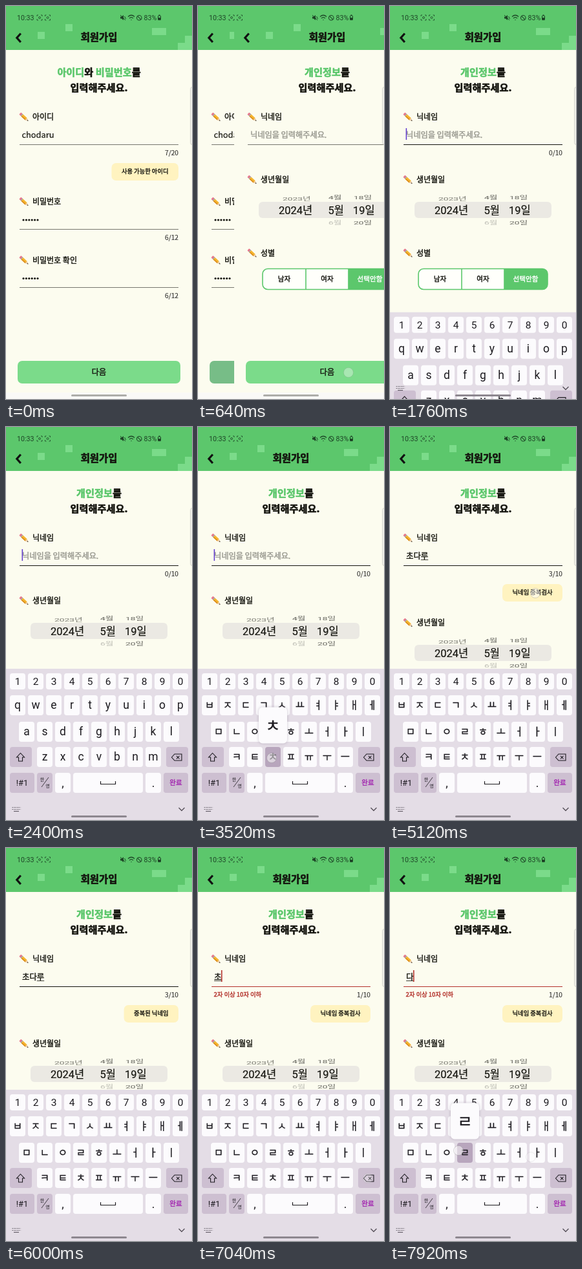
Recreate the animation shown at these times as an HTML page with a canvas. Size 288 px wide and 608 px high, loop 8000 ms.

```html
<!DOCTYPE html>
<html lang="ko">
<head>
<meta charset="utf-8">
<style>
html, body { margin: 0; width: 100%; height: 100%; overflow: hidden; background: #fcfcef; }
canvas { display: block; width: 288px; height: 608px; }
</style>
</head>
<body>
<canvas></canvas>
<script>
const W = 288, H = 608, LOOP = 8000;
const GREEN = '#5cc76c', LIGHT = '#7bdb8a', CREAM = '#fcfcef', INK = '#15150f', RED = '#b3312b';
const canvas = document.querySelector('canvas'), c = canvas.getContext('2d');
const dpr = window.devicePixelRatio || 1;
canvas.width = W * dpr;
canvas.height = H * dpr;

const clamp = v => Math.max(0, Math.min(1, v));
const easeOut = (t, start, dur, power) => 1 - (1 - clamp((t - start) / dur)) ** power;

function box(x, y, w, h, r, fill, stroke, lw = 1) {
  c.beginPath();
  c.roundRect(x, y, w, h, r);
  if (fill) { c.fillStyle = fill; c.fill(); }
  if (stroke) { c.strokeStyle = stroke; c.lineWidth = lw; c.stroke(); }
}
function path(d, stroke, lw = 1, fill) {
  const p = new Path2D(d);
  if (fill) { c.fillStyle = fill; c.fill(p); }
  if (stroke) { c.strokeStyle = stroke; c.lineWidth = lw; c.stroke(p); }
}
const HANGUL = '"Noto Sans CJK KR", "Noto Sans CJK"', ROBOTO = 'Roboto, ' + HANGUL;
const setFont = (size, weight = 500, font = HANGUL) => c.font = `${weight} ${size}px ${font}, sans-serif`;

// y is the optical middle of the line, fat an outline that thickens the strokes
function text(s, x, y, size, { color = INK, weight = 500, align = 'left', font = HANGUL, fat = .4 } = {}) {
  setFont(size, weight, font);
  c.textAlign = align;
  c.fillStyle = c.strokeStyle = color;
  c.fillText(s, x, y + size * .37);
  if (fat) {
    c.lineWidth = fat;
    c.lineJoin = 'round';
    c.strokeText(s, x, y + size * .37);
    c.lineJoin = 'miter';
  }
  return c.measureText(s).width;
}

// ---- schedule ----
// down, up, x, y, fade
const taps = [
  [80, 480, 233, 567, 520], [1360, 1450, 215, 200], [2640, 2750, 60, 549],
  [3500, 3600, 114, 512], [3620, 3700, 170, 473], [3760, 3840, 72, 432],
  [3900, 3980, 218, 474], [4060, 4150, 112, 465], [4170, 4250, 199, 513],
  [5120, 5230, 225, 257], [6400, 6540, 263, 511], [6640, 6720, 263, 511],
  [6860, 6940, 263, 511], [7100, 7180, 263, 511],
  [7500, 7590, 72, 432], [7700, 7800, 218, 478], [7900, 8100, 106, 468]
];
const edits = [
  [1400, ''], [3600, 'ㅊ'], [3700, '초'], [3840, '촏'], [3980, '초다'], [4150, '초달'], [4250, '초다루'],
  [6540, '초달'], [6720, '초다'], [6940, '초'], [7180, ''], [7590, 'ㄷ'], [7800, '다']
];
const FOCUS = 1600, KOREAN = 2880, TYPING = 3600, TAKEN = 5440, CLEARING = 6540;

// ---- keyboard layout ----
const keys = [];
function row(x, y, h, en, ko) {
  [...en].forEach((ch, i) => keys.push({ x: x + i * 28, y, w: 24, h, en: ch, ko: ko[i] }));
}
row(6, 381, 25, '1234567890', '1234567890');
row(6, 415, 31, 'qwertyuiop', 'ㅂㅈㄷㄱㅅㅛㅕㅑㅐㅔ');
row(20, 456, 31, 'asdfghjkl', 'ㅁㄴㅇㄹㅎㅗㅓㅏㅣ');
row(48, 495, 31, 'zxcvbnm', 'ㅋㅌㅊㅍㅠㅜㅡ');
for (const [x, y, w, en, dark] of [
  [6, 495, 34, '', 1], [248, 495, 34, '', 1], [6, 535, 38, '!#1', 1], [48, 535, 24, '', 1],
  [76, 535, 24, ','], [104, 535, 108, ''], [216, 535, 24, '.'], [244, 535, 38, '완료', 1]
]) keys.push({ x, y, w, h: 31, en, ko: en, dark });

const hit = (k, x, y) => x >= k.x && x <= k.x + k.w && y >= k.y && y <= k.y + k.h;

// ---- page parts ----
function header() {
  box(0, 0, W, H, 0, CREAM);
  box(0, 0, W, 68, 0, GREEN);
  for (const [x, y, w, h] of [[49, 40, 11, 11], [92, 28, 11, 11], [226, 34, 22, 11], [266, 57, 22, 11], [277, 46, 11, 11]])
    box(x, y, w, h, 0, LIGHT);
  path('M22.8 42.5L16.8 49.2L22.8 56', '#111', 3.2);
  text('회원가입', 144, 48, 15.4, { weight: 700, align: 'center', fat: .6 });
}
function title(parts) {
  const opt = { weight: 900, fat: .6 };
  setFont(15.2, 900);
  let x = 144 - c.measureText(parts.map(p => p[0]).join('')).width / 2;
  for (const [s, color] of parts) x += text(s, x, 102, 15.2, { ...opt, color });
  text('입력해주세요.', 144, 126, 15.2, { ...opt, align: 'center' });
}
function label(s, y) {
  c.save();
  c.translate(28, y);
  c.rotate(Math.PI / 4.2);
  box(-8.5, -2.2, 3.2, 4.4, 1, '#e8798c');
  box(-5.6, -2.2, 1.4, 4.4, 0, '#9aa0a6');
  box(-4.2, -2.2, 8.4, 4.4, 0, '#f5b52e');
  box(-4.2, .7, 8.4, 1.5, 0, '#d98a1e');
  path('M4.2 -2.2L9 0L4.2 2.2Z', null, 0, '#ecc9a0');
  path('M7 -.9L9 0L7 .9Z', null, 0, '#333');
  c.restore();
  text(s, 41, y, 12);
}
const rule = (y, color) => path(`M21 ${y}H267`, color);
const counter = (s, y) => text(s, 267, y, 10.2, { align: 'right', color: '#333', weight: 400, fat: .15 });

function chip(s, shade = 0) {
  setFont(9.3);
  const w = c.measureText(s).width + 31;
  box(267 - w, 243, w, 27, 7, '#fff3c0');
  if (shade) box(267 - w, 243, w, 27, 7, `rgba(90,80,40,${shade})`);
  text(s, 267 - w / 2, 256, 9.3, { align: 'center' });
}
function nextButton(shade = 0) {
  box(18, 549, 252, 35, 7, LIGHT);
  if (shade) box(18, 549, 252, 35, 7, `rgba(110,100,125,${shade})`);
  text('다음', 144, 566, 12.2, { align: 'center' });
}

function accountPage(t) {
  header();
  title([['아이디', GREEN], ['와 ', INK], ['비밀번호', GREEN], ['를', INK]]);
  label('아이디', 172);
  text('chodaru', 24.5, 199, 12.8, { weight: 400, fat: .2 });
  rule(214.5, '#77776f');
  counter('7/20', 227);
  chip('사용 가능한 아이디');
  [['비밀번호', 303], ['비밀번호 확인', 393.5]].forEach(([s, y]) => {
    label(s, y);
    for (let i = 0; i < 6; i++) box(25.4 + i * 4.4, y + 26.4, 3.2, 3.2, 1.6, INK);
    rule(Math.floor(y) + 42.5, '#77776f');
    counter('6/12', y + 55);
  });
  nextButton(.25 * clamp((t - 80) / 200));
}

function nickname(t, base, value) {
  const focused = t >= FOCUS, wrong = t >= TYPING && value.length < 2;
  label('닉네임', 172);
  let x = 25;
  if (value) {
    const done = text(value.slice(0, -1), x, 199, 12.4);
    const last = text(value.slice(-1), x + done, 199, 12.4);
    path(`M${x + done} 205.5h${last}`, INK, .8);
    x += done + last;
  } else text('닉네임을 입력해주세요.', x, 199, 12.2, { color: '#9b9b92', fat: .5 });
  rule(214.5, !focused ? '#77776f' : wrong ? RED : INK);
  if (!focused) return;
  if ((t - base) % 1000 < 500) box(x - .5, 189, 1.6, 18, 0, wrong ? RED : '#6540cf');
  counter(value.length + '/10', 227);
  if (wrong) text('2자 이상 10자 이하', 24.5, 227, 9.4, { color: RED });
}

function birthday() {
  label('생년월일', 269);
  box(38, 303, 212, 25, 6, '#ebe9e3');
  const opt = { weight: 400, font: ROBOTO, fat: .2 };
  [['2024년', 69], ['5월', 145.5], ['19일', 184]].forEach(([s, x]) => text(s, x, 315.5, 16.5, opt));
  for (const [s, x, y, color] of [['2023년', 75, 298, '#85857d'], ['4월', 146, 296.5, '#73736c'],
    ['18일', 185, 296.5, '#73736c'], ['6월', 146, 335, '#c4c4bb'], ['20일', 185, 335, '#73736c']]) {
    c.save();
    c.translate(x, y);
    c.scale(1, .58);
    text(s, 0, 0, 13.8, { ...opt, color });
    c.restore();
  }
}
function gender() {
  label('성별', 382.5);
  box(44, 406.5, 200, 32, 8, '#fffffb', GREEN, 1.6);
  box(177, 406.5, 67, 32, [0, 8, 8, 0], GREEN);
  path('M111 407V438M177 407V438', GREEN, 1.6);
  [['남자', 77.5], ['여자', 144], ['선택안함', 210, '#fff']].forEach(([s, x, color]) =>
    text(s, x, 422, 10.6, { color, align: 'center' }));
}
function profilePage(t) {
  const [base, value] = edits.filter((e, i) => !i || e[0] <= t).pop();
  header();
  title([['개인정보', GREEN], ['를', INK]]);
  nickname(t, base, value);
  if (value) chip(t >= TAKEN && t < CLEARING ? '중복된 닉네임' : '닉네임 중복검사', .1 * clamp((t - 5120) / 200) * (t < TAKEN));
  c.save();
  if (value) c.translate(0, 34);
  birthday();
  gender();
  c.restore();
  nextButton();
}

// ---- system parts ----
function statusBar() {
  const ink = '#1d4426', opt = { color: ink, weight: 400, font: ROBOTO, fat: 0 };
  text('10:33', 17, 18, 10.6, opt);
  for (const x of [48, 60.5]) {
    path(`M${x} 16v-2h2M${x + 6} 14h2v2M${x + 8} 20v2h-2M${x + 2} 22h-2v-2`, ink, .8);
    box(x + 2.5, 16.5, 3, 3, 1.5, null, ink, .8);
  }
  path('M177 16.5h2l3 -2.5v8l-3 -2.5h-2z', null, 0, ink);
  path('M177 14L185 22M183.5 16L185.5 20', ink);
  path('M189 16.5Q194 12 199 16.5M191 19Q194 16.2 197 19M194 21v1', ink, 1.2);
  box(202.5, 14.5, 7.5, 7.5, 4, null, ink, 1.1);
  path('M203.7 15.7L208.8 20.8', ink, 1.1);
  text('83%', 213.5, 18, 10.6, opt);
  box(235.5, 15, 4, 6.5, 1, null, ink);
  box(235.5, 18, 4, 4, 0, ink);
  box(236.5, 13.5, 2, 1.5, 0, ink);
}

function keyboard(t) {
  const drop = 234 * (1 - easeOut(t, FOCUS, 650, 3));
  const korean = t >= KOREAN, opt = { weight: 400, align: 'center', font: ROBOTO, color: '#1d1b20', fat: 0 };
  const active = taps.filter(p => t >= p[0] && t < p[1]);
  const pressed = k => active.some(p => hit(k, p[2], p[3]));
  c.save();
  c.translate(0, drop);
  box(0, 374, W, 234, 0, '#e4dde6');
  for (const k of keys) {
    box(k.x, k.y, k.w, k.h, 4, pressed(k) ? '#b8a6bd' : k.dark ? '#cdbfd1' : '#fcfbfd');
    const s = korean ? k.ko : k.en, done = s === '완료', jamo = korean && k.ko !== k.en;
    const size = done ? 10.5 : s === '!#1' ? 13 : k.h === 25 || jamo ? 15.5 : 17.5;
    text(s, k.x + k.w / 2, k.y + k.h / 2 - (/[a-z]/.test(s) ? .5 : 0), size,
      { ...opt, color: done ? '#a01fae' : opt.color, fat: jamo || done ? .3 : 0 });
  }
  path('M22.5 504.5L28.5 511H25.5V517H19.5V511H16.5Z', '#1d1b20', 1.1);
  path('M256.5 511L261 506H272V516H261ZM264 508.8l4.5 4.5M268.5 508.8l-4.5 4.5', '#1d1b20', 1.1);
  path('M146.5 548v4.5h23v-4.5', '#1d1b20', 1.2);
  path('M55 557L66 542', '#1d1b20', .8);
  text('한', 56, 545, 7, opt);
  text('영', 64.5, 555, 7, opt);
  c.restore();
  for (const k of keys) if (k.ko !== k.en && pressed(k)) {
    const x = k.x + k.w / 2 - 22, y = k.y - 61.5;
    c.save();
    c.shadowColor = 'rgba(60,40,70,.25)';
    c.shadowBlur = 4;
    box(x, y, 44, 56, 6, '#fcfbfd');
    c.restore();
    text(korean ? k.ko : k.en, x + 22, y + 28.5, 25, { ...opt, fat: .4 });
  }
  c.setLineDash([1.5, 1]);
  path('M9.5 588.5h13M9.5 591.5h13', '#655f68', 1.2);
  c.setLineDash([]);
  path('M12 594.5h8', '#655f68', 1.2);
  path('M267.5 589L272 593.5L276.5 589', '#554f58', 1.3);
}

function touches(t) {
  for (const [down, up, x, y, fade = 220] of taps) {
    if (t < down || t > up + fade) continue;
    c.globalAlpha = 1 - clamp((t - up) / fade);
    box(x - 7.5, y - 7.5, 15, 15, 7.5, 'rgba(255,255,255,.5)', 'rgba(110,110,110,.25)');
    c.globalAlpha = 1;
  }
}

function draw(now) {
  const t = now % LOOP;
  c.setTransform(dpr, 0, 0, dpr, 0, 0);
  const slide = W * (1 - easeOut(t, 300, 610, 2));
  if (slide > 0) accountPage(t);
  if (slide < W) {
    c.save();
    c.translate(slide, 0);
    profilePage(t);
    c.restore();
  }
  box(0, 598, W, 10, 0, '#f9f9f7');
  statusBar();
  box(285.5, 125.5, 8, 89, 3, '#f4f4ec', '#d5d5cd');
  if (t >= FOCUS) keyboard(t);
  box(101, 601, 86, 3, 1.5, t >= FOCUS ? '#8d878f' : '#adada9');
  touches(t);
  requestAnimationFrame(draw);
}
requestAnimationFrame(draw);
</script>
</body>
</html>
```
